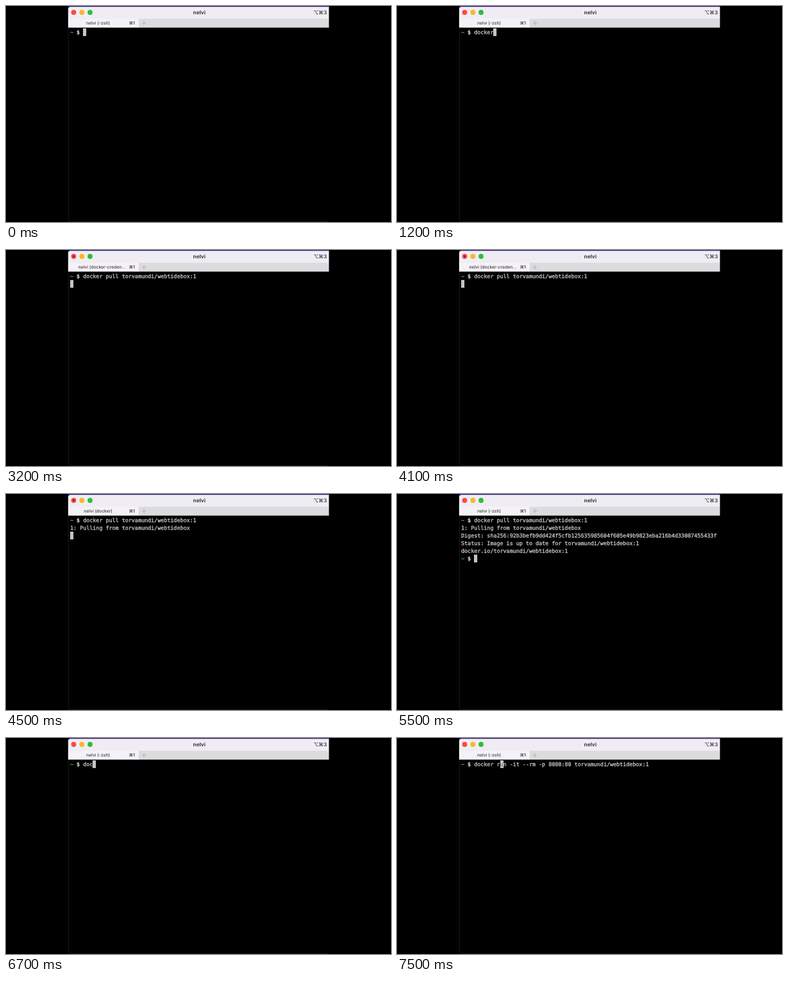
Write an HTML page that moves like this. It is 600 by 338 pixels and loops after 8 s.

```html
<!DOCTYPE html>
<html lang="en">
<head>
<meta charset="utf-8">
<title>Terminal</title>
<style>
  html, body { margin: 0; width: 100%; height: 100%; overflow: hidden; background: #000; }
  svg, pre { position: absolute; left: 0; top: 0; }
  svg { font-family: Inter, "DejaVu Sans", sans-serif; fill: #3c3b3f; text-rendering: geometricPrecision; }
  pre {
    left: 100px; top: 35.3px; margin: 0; color: #c9c9c9;
    font: 8.4px/12px "DejaVu Sans Mono", monospace;
    text-rendering: geometricPrecision; -webkit-text-stroke: .3px;
  }
  pre b { color: #29b52b; }
  pre u { font-weight: bold; text-decoration: none; }
  pre i {
    display: inline-block; width: 5.06px; height: 12px; vertical-align: top;
    font-style: normal; background: #c4c4c4; color: #555; box-shadow: 0 0 .6px #c4c4c4;
    -webkit-text-stroke: 0;
  }
</style>
</head>
<body>
<svg width="600" height="338" viewBox="0 0 600 338">
  <rect x="96.8" width="406.5" height="6" fill="#2f1474"/>
  <path d="M96.8 20V5q0-3.8 4-3.8H503.3V20z" fill="#efedf3"/>
  <rect x="96.8" y="20" width="110.2" height="13.8" fill="#f4f2f6"/>
  <rect x="207" y="20" width="296.3" height="13.8" fill="#dcdbde"/>
  <path d="M207.5 20v13.8" stroke="#cbc9cd" stroke-width=".6"/>
  <path d="M211.5 27h7M215 23.5v7" stroke="#a9a8ac" stroke-width=".8"/>
  <path d="M97.3 34V334q0 3.5 4 3.5H503" fill="none" stroke="#24212c" stroke-width=".8"/>
  <circle cx="105.5" cy="10" r="3.9" fill="#fb4a47"/>
  <circle id="dot" cx="105.5" cy="10" r="1.4" fill="#7c0f10"/>
  <circle cx="118.3" cy="10" r="3.9" fill="#fdb527"/>
  <circle cx="131" cy="10" r="3.9" fill="#2bc038"/>
  <text x="301.3" y="12.8" font-size="8.2" font-weight="650" text-anchor="middle">nelvi</text>
  <text x="500" y="12.6" font-size="8" font-weight="600" text-anchor="end">⌥⌘3</text>
  <text id="tab" y="29.2" font-size="6.8" font-weight="500" text-anchor="middle"></text>
  <text x="201" y="29.2" font-size="6.8" font-weight="600" text-anchor="end">⌘1</text>
</svg>
<pre id="screen"></pre>
<script>
const $ = id => document.getElementById(id);
const image = 'torvamundi/webtidebox';
const prompt = '<b>~</b> <u>$</u> ';
const pull = `docker pull ${image}:1`;
const run = `docker run -it --rm -p 8080:80 ${image}:1`;
const started = prompt + pull + '\n';
const pulling = started + `1: Pulling from ${image}\n`;
const done = pulling +
  'Digest: sha256:92b3befb9dd424f5cfb125635985604f605e49b9823eba216b4d33087455433f\n' +
  `Status: Image is up to date for ${image}:1\ndocker.io/${image}:1\n` + prompt;

// The cursor covers the first character of the text after it.
const withCursor = (before, after = ' ') => `${before}<i>${after[0]}</i>${after.slice(1)}`;
const typed = (text, n) => withCursor(prompt + text.slice(0, n));
const recalled = text => withCursor(prompt + text.slice(0, 8), text.slice(8));
const at = (steps, t) => steps.findLast(s => t >= s[0])[1];

const screens = [
  ...[[0, 0], [500, 2], [700, 4], [1000, 5], [1200, 6], [1300, 7], [1500, 8]]
    .map(([t, n]) => [t, typed(pull, n)]),
  [2100, recalled(pull)],
  [2500, withCursor(started)],
  [4500, withCursor(pulling)],
  [4900, withCursor(done)],
  [5900, typed(run, 0)],
  ...Array.from({ length: 8 }, (_, i) => [6500 + i * 100, typed(run, i + 1)]),
  [7500, recalled(run)]
];
const jobs = [[0, '-zsh)'], [2800, 'docker)'], [3000, 'docker-creden…'], [4500, 'docker)'], [5500, '-zsh)']];

let last;
function draw(now) {
  const t = now % 8000;
  const html = at(screens, t);
  const job = at(jobs, t);
  if (html + job !== last) {
    last = html + job;
    $('screen').innerHTML = html;
    $('tab').textContent = `nelvi (${job}`;
    $('tab').setAttribute('x', job.endsWith('…') ? 149.5 : 143.5);
    $('dot').style.opacity = +(job !== '-zsh)');
  }
  requestAnimationFrame(draw);
}
draw(0);
</script>
</body>
</html>
```
